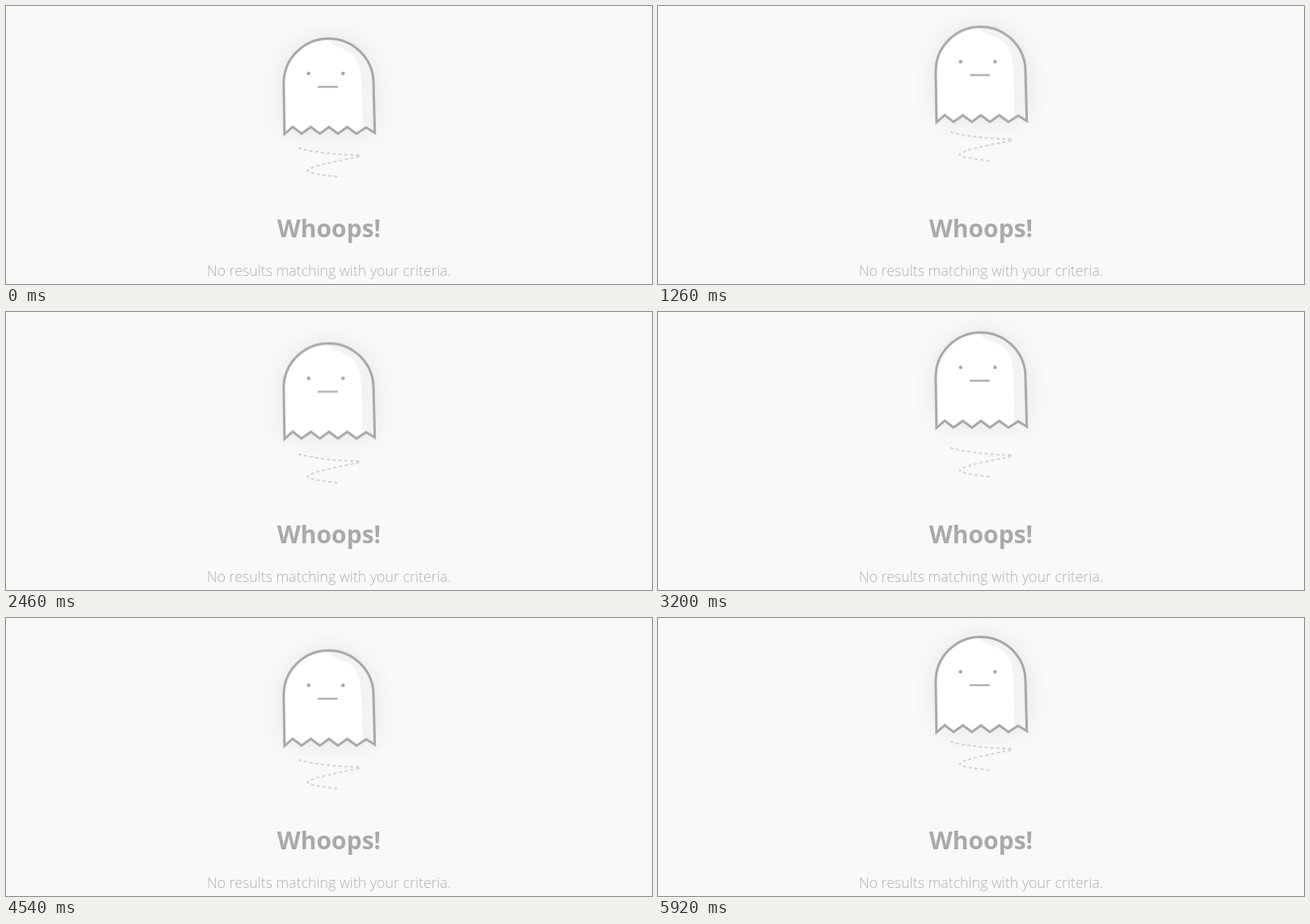
An HTML page that plays this animation: 800x345 px, repeating every 6.66 s.

```html
<!DOCTYPE html>
<html lang="en">
<head>
<meta charset="utf-8">
<title>No results</title>
<style>
  html, body { margin: 0; width: 100%; height: 100%; overflow: hidden; background: #f9f9f9; }
  svg { display: block; width: 800px; height: 345px; }
  text { font-family: "Open Sans", "Noto Sans", sans-serif; text-anchor: middle; }
  .title { font-size: 30px; font-weight: 700; fill: #a9a9a9; }
  .note { font-size: 17.8px; font-weight: 300; fill: #b0b0b0; }
  .line { fill: none; stroke: #a8a8a8; }
  .ghost { animation: float 6660ms infinite; }
  .trail { animation: follow 6660ms infinite; }

  /* 2400 ms bounces; the last one holds at the top, then restarts hard */
  @keyframes float {
    0%, 36.036%, 72.072% { transform: translateY(0); animation-timing-function: ease-out; }
    16.667%, 52.703% { transform: translateY(-17px); animation-timing-function: ease; }
    34.685%, 70.721% { transform: translateY(0); }
    88.739%, 100% { transform: translateY(-17px); }
  }
  @keyframes follow {
    0%, 34.685%, 70.721% { transform: translateY(0); }
    8.934%, 44.97%, 81.006% { transform: translateY(0); animation-timing-function: ease-in-out; }
    16.667%, 52.703% { transform: translateY(-23px); animation-timing-function: ease; }
    88.739%, 100% { transform: translateY(-23px); }
  }
</style>
</head>
<body>
<svg viewBox="0 0 800 345">
  <defs>
    <path id="body" d="M344.9 159 L343.9 96 A55.6 55.6 0 0 1 455.1 96 L456.7 157.3 L446 150.8 L434 158.5 L422.7 150.2 L411 158.5 L400 150.2 L388.7 158.5 L377.5 150.2 L366 158.5 L355 150Z"/>
    <clipPath id="inside"><use href="#body"/></clipPath>
    <filter id="blur" filterUnits="userSpaceOnUse" x="270" y="-40" width="260" height="280">
      <feGaussianBlur stdDeviation="17"/>
    </filter>
  </defs>

  <g class="ghost">
    <use href="#body" fill="#000" opacity=".085" filter="url(#blur)"/>
    <use href="#body" fill="#fff"/>
    <path clip-path="url(#inside)" fill="#f3f3f3" d="M395 38 C401 50 415 50 427 58 C437 65 440 80 440 97 L442 165 H470 V30 H395Z"/>
    <use href="#body" class="line" stroke-width="3"/>
    <g fill="#a8a8a8">
      <circle cx="374.7" cy="83.7" r="2.3"/>
      <circle cx="417.4" cy="83.7" r="2.3"/>
    </g>
    <path class="line" stroke-width="2.2" stroke-linecap="round" d="M387 100.4 H410"/>
  </g>

  <path class="trail" fill="none" stroke="#d3d3d6" stroke-width="2" stroke-dasharray="4 3.2"
    d="M362 176.3 C382 181.5 410 185 438.5 185 C440 187.5 425 189 410 192.5 C392 196.5 376 200 373.5 204 C374 207.5 393 210 411 212"/>

  <text class="title" x="400" y="286.5">Whoops!</text>
  <text class="note" x="400" y="335">No results matching with your criteria.</text>
</svg>
</body>
</html>
```
